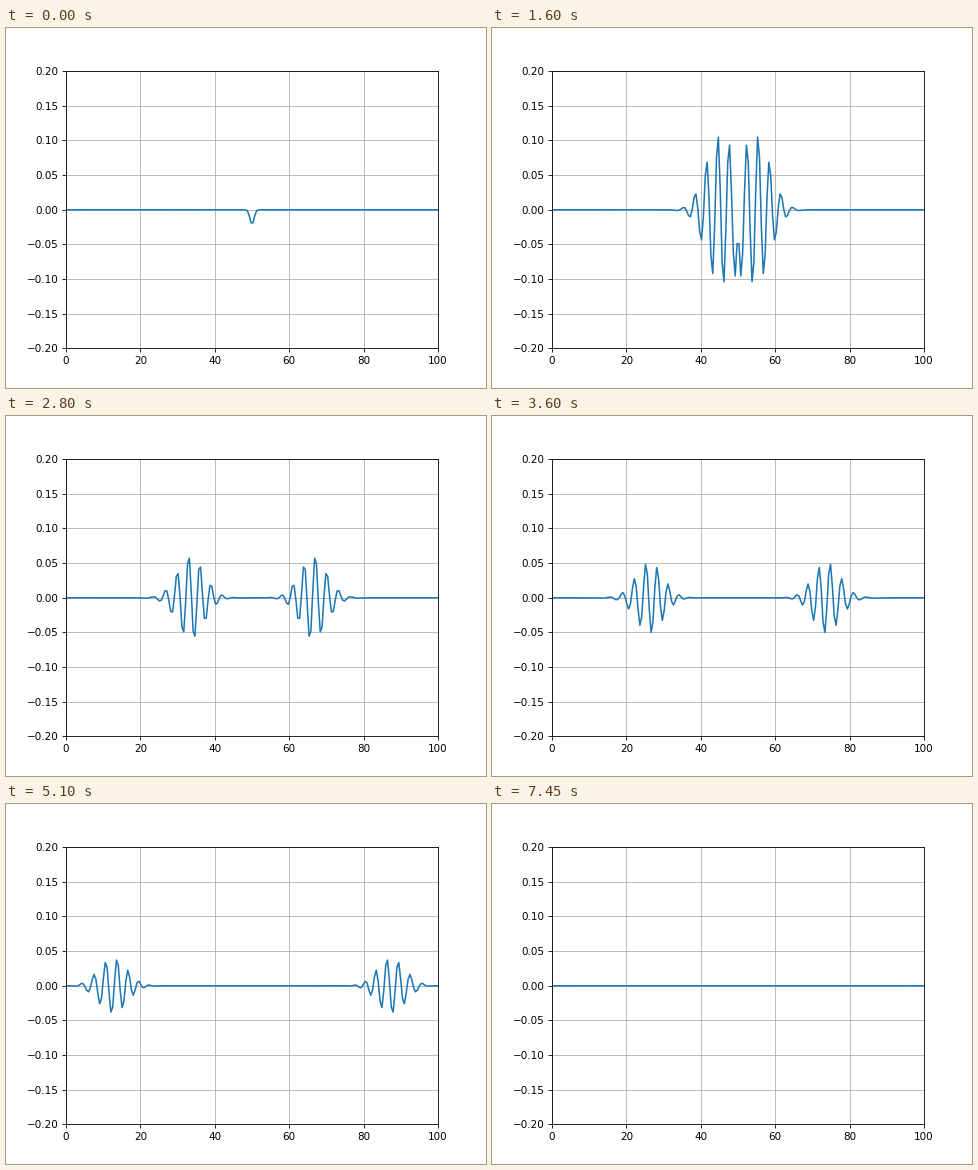
Recreate the animation shown at these times as a matplotlib script. Size 480 by 360 pixels, loop 9950 ms.

```python
import matplotlib.pyplot as plt
import numpy as np
from matplotlib.animation import FuncAnimation

N = 200                # grid cells per side
COURANT = 0.5          # two time steps per frame
LAYER = 10             # absorbing cells at the left and right edge
MOVING, TOTAL = 150, 199
WARM_UP = 4            # steps taken before the first frame


def absorb(position):
    """Decay and gain factors of the matched layer at the given cells."""
    depth = np.maximum(0, np.maximum(LAYER - position, position - (N - 1 - LAYER)))
    loss = 0.0059 * depth[:, None] ** 2
    return (1 - loss) / (1 + loss), COURANT / (1 + loss)


def pulse(t):
    return np.sin(1.01 * t) * np.exp(-t**2 / (2 * 7.9**2))


def simulate():
    """Two-dimensional wave from a pulsed centre; keeps the middle row per frame."""
    ez_x, ez_y = np.zeros((N, N)), np.zeros((N, N))
    hx, hy = np.zeros((N, N - 1)), np.zeros((N - 1, N))
    e_decay, e_gain = absorb(np.arange(1, N - 1))
    h_decay, h_gain = absorb(np.arange(N - 1) + 0.5)
    centre = slice(N // 2 - 1, N // 2 + 1)
    drive, rows = 0.0, []
    for step in range(WARM_UP + 2 * MOVING - 1):
        ez = ez_x + ez_y
        hx -= COURANT * np.diff(ez, axis=1)
        hy = h_decay * hy + h_gain * np.diff(ez, axis=0)
        ez_x[1:-1] = e_decay * ez_x[1:-1] + e_gain * np.diff(hy, axis=0)
        ez_y[:, 1:-1] -= COURANT * np.diff(hx, axis=1)
        drive += 0.1206 * pulse(step / 2 - 20.5)
        ez_x[centre, centre] += drive
        done = step + 1 - WARM_UP
        if done >= 0 and done % 2 == 0:
            rows.append((ez_x + ez_y)[:, N // 2])
    return rows


rows = simulate()
fig, ax = plt.subplots(figsize=(6.4, 4.8), dpi=75)
ax.set_xlim(0, 100)
ax.set_ylim(-0.2, 0.2)
ax.grid(True)
line, = ax.plot(np.linspace(0, 100, N), rows[0])


def update(frame):
    line.set_ydata(rows[min(frame, MOVING - 1)])
    return line,


anim = FuncAnimation(fig, update, frames=TOTAL, interval=50, repeat=True, repeat_delay=0)
plt.show()
```
